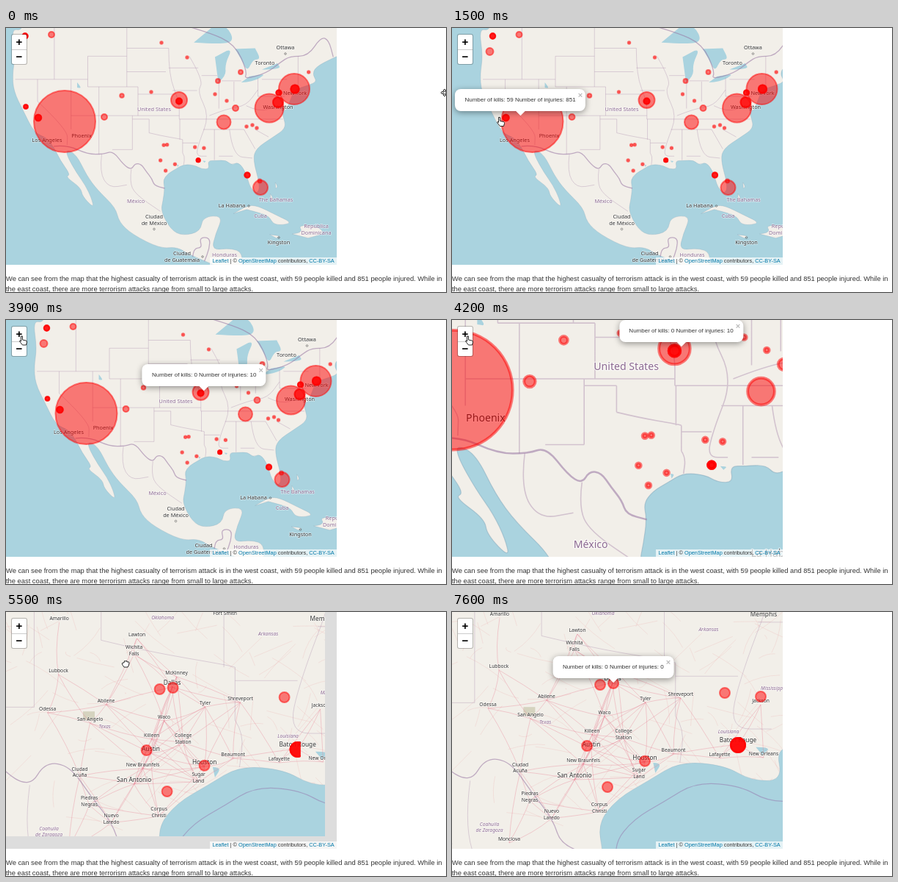
An HTML page with a canvas for the animation above (7.8 s loop, 600 px wide and 359 px high).

```html
<!DOCTYPE html>
<html lang="en">
<head>
<meta charset="utf-8">
<title>Casualty map</title>
<style>
html, body { margin: 0; width: 100%; height: 100%; overflow: hidden; background: #fff; }
body { position: relative; font-family: "Liberation Sans", Arial, sans-serif; color: #333; }
#map { position: absolute; left: 0; top: 0; width: 451px; height: 322px; overflow: hidden; background: #ddd; }
canvas { display: block; }
#zoom { position: absolute; left: 7px; top: 8px; width: 20px; border: 1.3px solid rgba(0,0,0,.25); border-radius: 3px;
  background: #fff; background-clip: padding-box; font: bold 15px/20px "Liberation Sans", sans-serif; color: #000; text-align: center; }
#zoom div { height: 20px; }
#zoom div + div { border-top: 1px solid #ccc; height: 19px; line-height: 18px; }
#credit { position: absolute; right: 0; bottom: 0; padding: 0 3.3px; background: rgba(255,255,255,.7);
  font-size: 7.35px; line-height: 10px; white-space: nowrap; }
#credit span { color: #0078a8; }
#popup { position: absolute; margin-top: -6.5px; height: 30px; padding: 0 13.5px; transform: translate(-50%, -100%);
  border-radius: 8px; background: #fff; box-shadow: 0 2px 9px rgba(0,0,0,.4); font-size: 8px; line-height: 30px; white-space: nowrap; }
#popup::before { content: ""; position: absolute; left: 50%; bottom: -4px; width: 11px; height: 11px; margin-left: -5.5px;
  background: #fff; transform: rotate(45deg); }
#popup span { position: relative; }
#popup b { position: absolute; right: 4px; top: 3px; font-size: 11px; line-height: 11px; color: #bbb; }
p { position: absolute; left: 0; top: 335.3px; margin: 0; font-size: 9.35px; line-height: 13.4px; white-space: nowrap; }
svg { position: absolute; left: 0; top: 0; width: 100%; height: 100%; }
</style>
</head>
<body>
<div id="map">
  <canvas id="cv" width="451" height="322"></canvas>
  <div id="popup"><span></span><b>×</b></div>
  <div id="zoom"><div>+</div><div>−</div></div>
  <div id="credit"><span>Leaflet</span> | © <span>OpenStreetMap</span> contributors, <span>CC-BY-SA</span></div>
</div>
<p>We can see from the map that the highest casualty of terrorism attack is in the west coast, with 59 people killed and 851 people injured. While in<br>the east coast, there are more terrorism attacks range from small to large attacks.</p>
<svg><path id="cursor" fill="#fff" stroke="#111" stroke-width=".9" stroke-linejoin="round"/></svg>
<script>
const $ = id => document.getElementById(id);
const ctx = $('cv').getContext('2d'), popup = $('popup'), cursor = $('cursor');
const LOOP = 7800, W = 451, H = 322, DEG = 180 / Math.PI, K = 7.608;

// Geography: longitude, latitude
const pacific = [-122.6,49, -122.8,48.1, -124.7,48.4, -124,45, -124.5,42.8, -124.3,40.4, -122.5,37.6, -120.6,34.5,
  -118.4,33.8, -117.1,32.4, -115.9,30.3, -114.1,28.1, -115,27.8, -112.2,26, -112,24.7, -109.9,22.7, -110.3,24.3,
  -111.4,26.4, -113,28.4, -114.7,31, -114.8,32, -113,31.2, -111.2,28, -109.3,25.7, -106,22.8, -105.4,20.4,
  -103,18.3, -98,15.9, -95,16.2, -92.5,14.7, -87.5,12.8];
const gulf = [-87,11, -83.6,11, -83.1,15.2, -85.5,16, -88.8,15.6, -88.1,18.4, -86.7,21.5, -90.4,21.3, -90.8,18.8,
  -94,18.1, -96.1,19.1, -97.9,22.2, -97.5,24, -97.2,26, -97.5,27.3, -96.6,28.3, -95.2,29, -93.8,29.75, -91.8,29.6,
  -90.6,29, -89.2,29, -89.5,30.3, -88.1,30.3];
const atlantic = [-86.2,30.4, -85.3,29.6, -84,30.1, -82.7,28.6, -81.9,26, -80.6,25, -80.1,26.4, -81.4,30.5, -80.8,32.2,
  -77.9,33.8, -75.4,35.2, -76,36.9, -76.4,38.8, -75.7,37.3, -74.6,39.3, -74,40.6, -71.5,41.2, -69.9,41.7, -70.7,42.6,
  -70.2,43.6, -67,44.8, -64.5,45.5, -66,43.6, -63.5,44.6, -60,46, -60,52, -123,52];
const cuba = [-84.9,21.8, -82.5,23.2, -80.5,23.1, -77.3,21.6, -74.1,20.2, -77.6,19.8, -78.5,21.4, -80.5,22, -82.5,22.5];
const hispaniola = [-74.4,18.4, -72.4,18.6, -73.3,19.9, -70,19.8, -68.4,18.5, -71.5,17.7];
const islets = [[-78.4,18.3, -76.2,18.1, -77.2,17.7], [-78.3,25.1, -77.6,24.2, -78.2,23.8], [-77.4,26.9, -76.9,26.3, -77.3,25.9]];
const lakes = [
  [-92,46.7, -87.5,46.5, -84.7,46.8, -86,48.7, -88.6,48.6],
  [-87.6,41.6, -86.2,42.4, -86.4,44, -85,46.1, -88.2,44.9],
  [-84.6,45.9, -83.4,44.5, -82.4,43, -81.4,44.6, -80,44.6, -81,46],
  [-83.5,41.6, -81.5,41.6, -78.8,42.8, -82,42.4], [-79.8,43.3, -76.3,43.3, -77,44.1],
  [-112.9,41.6, -112,40.8, -112.9,40.9], [-90.4,30.3, -89.7,30.3, -90.1,30], [-95,29.7, -94.6,29.7, -94.9,29.3]];

// Straight state lines: latitude with two longitudes, then longitude with two latitudes
const parallels = [[46,-104,-96.5], [45,-111,-104], [43,-104,-97], [42,-124,-111], [41,-111,-102], [40,-102,-95.3],
  [37,-114,-94.6], [36.5,-103,-100], [36.5,-94.6,-76], [32,-106.6,-103], [33,-94,-91.2], [35,-90.3,-83],
  [43.5,-96.5,-91.2], [40.5,-95.8,-91.4], [42.5,-90.6,-87.8], [41.8,-87,-83.5], [39.7,-80.5,-75.7], [42,-79.8,-75.3], [31,-87.5,-85]];
const meridians = [[-120,42,39], [-117,49,42], [-114,42,35], [-111,45,41], [-109,41,31.3], [-104,49,41], [-102,41,37],
  [-103,37,32], [-100,36.5,34.5], [-94.5,36.5,33.5], [-94,33.5,31.5], [-88.3,35,30.4], [-87.5,41.7,38],
  [-84.8,41.7,39], [-80.5,42.2,39.7], [-73.3,45,41]];
const winding = [
  [-120,39, -114.6,35, -114.7,32.7], [-100,34.5, -98,34.1, -94.5,33.6, -94,33.5], [-94,31.5, -93.6,31, -93.8,29.7],
  [-92.8,45, -90.2,41.8, -91.4,40.4, -89.2,37, -91.1,33, -91.6,31, -89.7,31], [-96.5,46, -96.5,42.5, -94.6,39, -94.6,36.5],
  [-89.2,37, -86,38, -82.6,38.4, -80.5,40.6], [-82.6,38.4, -80.3,37.5, -77,38.3], [-85.6,35, -85,31, -81.5,30.7],
  [-83,35, -81,32.1], [-81,35, -78.6,33.9], [-103.2,29, -103.5,27, -102.5,25, -98,22.2], [-108.5,31.3, -108.9,28.5, -107.2,26, -104,26.5]];
const frontiers = [
  [-117.1,32.5, -114.7,32.7, -111,31.3, -108.2,31.3, -106.5,31.8, -104.5,29.6, -103.2,28.9, -102.5,29.9, -101.4,29.75,
    -100.5,28.6, -99.5,27.5, -99.1,26.4, -97.2,25.95],
  [-95,49, -89.5,48, -84.6,46.5, -82.4,43, -83,42, -79,42.8, -76.5,44.2, -74.8,45, -71.5,45, -69.2,47.4, -67.8,47, -67,44.9],
  [-92.2,14.5, -92,16, -90.5,16, -91,17.8, -89.1,17.8, -89.2,15.9, -90.1,13.7]];

// Labels: text, x, y, dot offset; ~ marks a region, * a large city
const wideLabels = [['Ottawa',381,27,0,8], ['Toronto',353,48], ['~United States',202,111], ['New York',394,89],
  ['Washington',371,108], ['Los Angeles',56,153], ['Phoenix',103,147], ['~México',177,236], ['Ciudad\nde México',202,261.5,0,12],
  ['Ciudad\nde Guatemala',240,311,28,0], ['La Habana',308,242,23,0], ['~Cuba',347,256], ['~The Bahamas',368,234],
  ['Kingston',372,292,0,-7], ['~República\nDominicana',423,274], ['~Honduras',298,309]];
const midLabels = [['Tulsa',333,30,0,9], ['~Oklahoma',300,67], ['~Arkansas',430,86], ['Dallas',311,142],
  ['~Texas',229,199], ['Austin',285,223], ['Houston',350,239], ['San Antonio',264,269,1,-10], ['~Chihuahua',58,281],
  ['~Coahuila',161,320], ['Ciudad Juárez',46,198,1,-12], ['~New Mexico',57,105], ['Albuquerque',41,66,0,9],
  ['~Louisiana',457,211], ['Baton Rouge',466,237]];
const closeLabels = [['Amarillo',65,3], ['~Oklahoma',206,2], ['Fort Smith',291,-4], ['*Memphis',425,4],
  ['~Arkansas',350,24], ['Lawton',171,25], ['Wichita\nFalls',167,46.5], ['Lubbock',64,74], ['Abilene',129,115],
  ['Odessa',49,126], ['San Angelo',107,140], ['~Texas',127,150], ['Waco',208,137], ['McKinney',225,77], ['*Dallas',219,91],
  ['Tyler',264,118], ['Shreveport',312,112], ['Killeen',191,162], ['College\nStation',234,166.5], ['*Austin',190,181],
  ['*Houston',263,199], ['Sugar\nLand',255,219.5], ['Beaumont',302,188], ['*Baton Rouge',390,175], ['~Louisiana',377,163],
  ['Lafayette',365,194], ['New Orleans',425,193], ['New Braunfels',179,202], ['*San Antonio',167,223], ['Ciudad\nAcuña',93,212],
  ['Piedras\nNegras',106,251.5], ['Nuevo\nLaredo',136,275.5], ['Corpus\nChristi',201,266.5], ['~Coahuila\nde Zaragoza',51,293],
  ['Monclova',78,309], ['Jackson',421,121], ['~Mississippi',437,104]];
const labelSets = [
  { s: 1, ox: 0, oy: 0, items: wideLabels },
  { s: 3.6, ox: -478.8, oy: -418.6, items: midLabels },
  { s: 4, ox: -658.6, oy: -538, items: closeLabels }];

// Incidents: x, y, radius, overlapping reports
const minor = [[198,87], [212,20], [247,40], [285,90], [301,99], [328,134], [336,132], [342,136], [412.7,60],
  [215.15,159.25], [219.65,158.75], [257.65,162], [269.9,163.25], [210.65,180], [230.4,185.2], [217.65,194]];
const major = [[80,127,42], [27,107,2.8,3], [44,122,4.2,3], [134,121,4], [158,92,2.8], [236,98,11], [236,99.5,4,3],
  [289,72,3], [320,60,3], [313,109,4], [297,128,9.5], [359,109,19.5], [371,101,7,2], [372,88,3.6,3], [393,83,21],
  [394,83,5.6,3], [62,9,4], [26,11,3.7,3], [22,32,5], [262.15,179.75,2.5,4], [329,200,3.6,3], [347,217,10], [346,208,2.6]];

const project = (lon, lat) => [80 + K * (lon + 115.14), 127 - K * DEG * (Math.log(Math.tan(Math.PI / 4 + lat / 2 / DEG)) - .678)];
const points = flat => flat.flatMap((v, i) => i % 2 ? [] : [project(v, flat[i + 1])]);

function trace(lists, round, close) {
  const path = new Path2D();
  for (const list of lists) {
    const p = points(list);
    path.moveTo(...p[0]);
    for (let i = 1; i < p.length; i++) {
      const [x, y] = p[i], [nx, ny] = p[i + 1] || p[i];
      if (round) path.quadraticCurveTo(x, y, (x + nx) / 2, (y + ny) / 2);
      else path.lineTo(x, y);
    }
    if (close) path.closePath();
  }
  return path;
}

const land = trace([[...pacific, ...gulf, ...atlantic], cuba, hispaniola, ...islets], true, true);
const water = trace(lakes, true, true), borders = trace(frontiers, true);
const states = trace([...parallels.map(([lat, a, b]) => [a, lat, b, lat]), ...meridians.map(([lon, a, b]) => [lon, a, lon, b])]);
states.addPath(trace(winding, true));
const shelf = trace([gulf.slice(24)], true);

// Roads join neighbouring towns; small ones wander at random
let seed = 7;
const rand = () => (seed = seed * 16807 % 2147483647) / 2147483647;
const mainRoads = new Path2D(), sideRoads = new Path2D();
const bend = (path, x, y, X, Y) => {
  path.moveTo(x, y);
  path.quadraticCurveTo((x + X) / 2 + rand() * 3 - 1.5, (y + Y) / 2 + rand() * 3 - 1.5, X, Y);
};
const close = labelSets[2];
const towns = closeLabels.filter(l => l[0][0] !== '~').map(l => [(l[1] - close.ox) / 4, (l[2] + 5 - close.oy) / 4]);
towns.forEach(([x, y], i) => towns.slice(i + 1).forEach(([X, Y]) => {
  if (Math.hypot(X - x, Y - y) < 25) bend(mainRoads, x, y, X, Y);
}));
for (let i = 0; i < 130; i++) {
  const x = 160 + rand() * 125, y = 130 + rand() * 75;
  bend(sideRoads, x, y, x + rand() * 30 - 15, y + rand() * 24 - 12);
}

const ramp = (t, a, b) => Math.min(1, Math.max(0, (t - a) / (b - a)));
const easeOut = p => 1 - (1 - p) ** 3;
const smooth = p => p * p * (3 - 2 * p);

function viewAt(t) {
  if (t < 4050) return { s: 1, ox: 29.5 * easeOut(ramp(t, 1150, 1400)), oy: 0, level: 0 };
  const s = 1 + easeOut(ramp(t, 4050, 4300)) + 2 * easeOut(ramp(t, 4500, 4750));
  const drag = smooth(ramp(t, 5000, 5500)), glide = easeOut(ramp(t, 5500, 5650));
  return { s, ox: 225 - 195.5 * s - 94 * drag - 7.6 * glide, oy: 161 - 161 * s - 49 * drag - 6 * glide,
    level: t < 4300 ? 0 : t < 4750 ? 1 : 2 };
}

function drawLabels(view, mag) {
  const set = labelSets[view.level], k = view.s / set.s;
  const place = (x, y) => [k * (x - set.ox) + view.ox, k * (y - set.oy) + view.oy];
  ctx.textAlign = 'center';
  ctx.textBaseline = 'middle';
  ctx.lineJoin = 'round';
  for (const [name, lx, ly, dx, dy] of set.items) {
    const region = name[0] === '~', large = name[0] === '*';
    const [x, y] = place(lx, ly);
    const size = (large ? 8.3 : view.level === 2 ? 6.7 : 7.3) * mag;
    ctx.font = `${region && view.level ? 'italic ' : ''}${size}px "Noto Sans", sans-serif`;
    ctx.fillStyle = region ? '#8d6a93' : '#333';
    ctx.strokeStyle = 'rgba(255,255,255,.55)';
    ctx.lineWidth = 1.4 * mag;
    const rows = name.replace(/^[~*]/, '').split('\n');
    rows.forEach((row, i) => {
      const ry = y + (i - (rows.length - 1) / 2) * size * 1.22;
      ctx.strokeText(row, x, ry);
      ctx.fillText(row, x, ry);
    });
    if (dx === undefined) continue;
    ctx.beginPath();
    ctx.arc(...place(lx + dx, ly + dy), 1.3 * mag, 0, 7);
    ctx.strokeStyle = '#555';
    ctx.lineWidth = .6 * mag;
    ctx.stroke();
  }
}

function clipTo(x, y) {
  ctx.beginPath();
  ctx.rect(0, 0, x, y);
  ctx.clip();
}

function drawMap(t, view) {
  const { s, ox, oy, level } = view, unit = 1 / 2 ** level, mag = s * unit;
  const partial = level === 2 && t < 5600; // outer tiles have not arrived yet
  const line = (path, color, width) => {
    ctx.strokeStyle = color;
    ctx.lineWidth = width * unit;
    ctx.stroke(path);
  };
  ctx.clearRect(0, 0, W, H);
  ctx.save();
  if (partial) clipTo(s * 271.5 + ox, s * 209.25 + oy);
  ctx.fillStyle = '#aad3df';
  ctx.fillRect(0, 0, W, H);
  ctx.save();
  ctx.transform(s, 0, 0, s, ox, oy);
  ctx.fillStyle = '#f2efe9';
  ctx.fill(land);
  line(land, 'rgba(130,165,185,.5)', .6);
  ctx.fillStyle = '#aad3df';
  ctx.fill(water);
  if (level) {
    ctx.fillStyle = '#d5d3bf';
    ctx.fillRect(189, 166.8, 4, 3);
    ctx.fillRect(135, 144, 5, 3.5);
  }
  if (level === 2) {
    ctx.save();
    ctx.clip(land);
    line(sideRoads, 'rgba(235,165,165,.4)', .6);
    line(mainRoads, 'rgba(228,125,145,.5)', .7);
    ctx.restore();
    ctx.save();
    ctx.translate(5.5, 7);
    line(shelf, 'rgba(150,125,175,.55)', 1.2);
    ctx.restore();
  }
  line(states, 'rgba(160,125,165,.4)', .8);
  line(borders, 'rgba(150,115,160,.55)', 1.3);
  ctx.restore();
  drawLabels(view, mag);
  ctx.restore();

  ctx.save();
  if (partial) clipTo(s * 263.15 + ox, s * 209.25 + oy);
  ctx.fillStyle = ctx.strokeStyle = 'rgba(255,0,0,.5)';
  ctx.lineWidth = 2 * mag;
  for (const [x, y, r = 1.75, n = 1] of [...minor, ...major]) {
    ctx.beginPath();
    ctx.arc(s * x + ox, s * y + oy, s * r, 0, 7);
    for (let i = 0; i < n; i++) { ctx.fill(); ctx.stroke(); }
  }
  ctx.restore();
}

// Popups: opening time, map anchor, killed, injured
const popups = [[1150, 63.5, 119, 59, 851], [2600, 240.7, 96.5, 0, 10], [7250, 219.6, 158.5, 0, 0]];

function drawPopup(t, { s, ox, oy }) {
  const open = popups.filter(p => t >= p[0]).pop();
  popup.style.display = open ? '' : 'none';
  if (!open) return;
  const [start, x, y, kills, injuries] = open;
  popup.firstChild.textContent = `Number of kills: ${kills} Number of injuries: ${injuries}`;
  popup.style.left = s * x + ox + 'px';
  popup.style.top = s * y + oy + 'px';
  popup.style.opacity = ramp(t, start, start + 200);
}

const shapes = {
  move: 'M0-5l2 2h-1v2h2v-1l2 2-2 2v-1h-2v2h1l-2 2-2-2h1v-2h-2v1l-2-2 2-2v1h2v-2h-1z',
  arrow: 'M0 0v9l2-2 2 4 1-1-2-3h3z',
  point: 'M-1 0h2v5l5 1q1 1 1 2l-1 4h-5l-4-5q0-2 2 0z',
  grab: 'M-4-1h2q0-4 2-2q2-2 2 1q3-1 3 1q0 3-2 6h-5q-4-5-2-6z'
};
// Pointer: time, x, y, shape
const moves = [[0,598,88,'move'], [100,597,92,'arrow'], [900,540,150,'arrow'], [1000,420,165,'grab'],
  [1100,64.5,121.5,'point'], [1700,64.5,121.5,'grab'], [2300,270,98,'point'], [3300,270,98,'grab'],
  [3800,21.5,22,'point'], [4400,21.5,22,'grab'], [4600,76,42,'grab'], [5000,257,119,'grab'], [5500,163,70,'grab'],
  [5700,155,64,'grab'], [6100,470,250,'arrow'], [6400,575,348,'arrow'], [6500,430,370,'grab'], [7100,220,98,'point'], [7300,220,98,'']];

function drawCursor(t) {
  const i = moves.findLastIndex(m => m[0] <= t), a = moves[i], b = moves[i + 1] || a;
  let p = a === b ? 0 : ramp(t, a[0], b[0]);
  if (a[0] === 5000) p = smooth(p);
  cursor.setAttribute('d', shapes[a[3]] || '');
  cursor.setAttribute('transform', `translate(${a[1] + (b[1] - a[1]) * p} ${a[2] + (b[2] - a[2]) * p})`);
}

function frame() {
  const t = Math.floor(performance.now() % LOOP / 100) * 100, view = viewAt(t);
  drawMap(t, view);
  drawPopup(t, view);
  drawCursor(t);
  requestAnimationFrame(frame);
}
frame();
</script>
</body>
</html>
```
